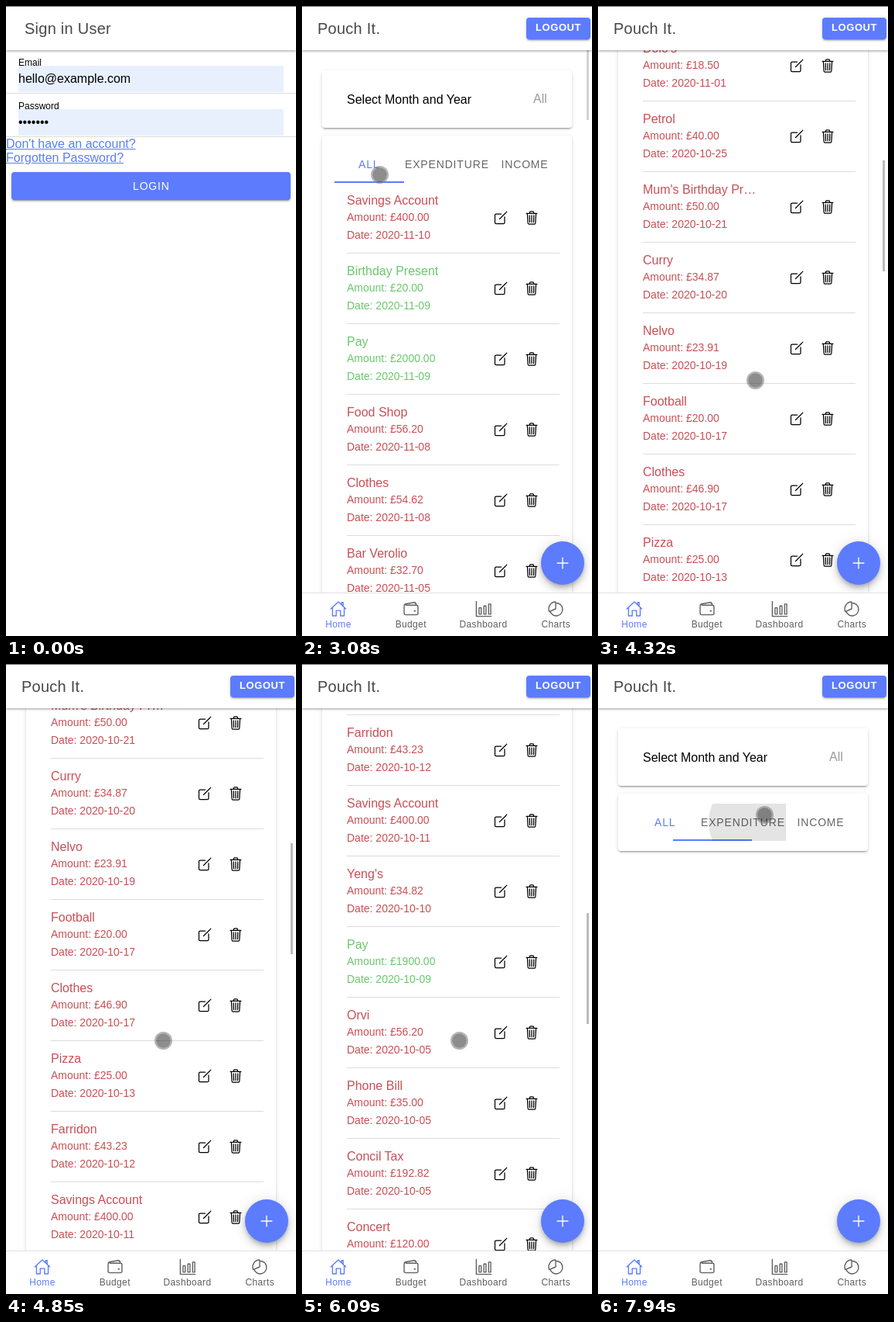
Recreate the animation shown at these times as an HTML page. Size 375 by 812 pixels, loop 8 s.

```html
<!DOCTYPE html>
<html lang="en">
<head>
<meta charset="utf-8">
<title>Budget app</title>
<style>
html, body { margin: 0; width: 100%; height: 100%; overflow: hidden; background: #fff; }
body { position: relative; font-family: "Liberation Sans", Arial, sans-serif; color: #000; --blue: #5c7cfd; }
div, p, svg { position: absolute; margin: 0; box-sizing: border-box; }
p { line-height: 20px; white-space: pre; }
svg { fill: none; stroke: currentColor; stroke-width: 32; stroke-linecap: round; stroke-linejoin: round; }
.page { width: 375px; height: 812px; overflow: hidden; background: #fff; }
.header { width: 375px; height: 57px; background: #fff; color: #484848; box-shadow: 0 1px 3px rgba(0,0,0,.4); }
.header p { letter-spacing: .0125em; }
.button { background: var(--blue); color: #fff; border-radius: 4px; }
.button, .card { box-shadow: 0 3px 1px -2px rgba(0,0,0,.2), 0 2px 2px rgba(0,0,0,.14), 0 1px 5px rgba(0,0,0,.12); }
.header .button p { letter-spacing: .045em; font-weight: 600; }
.field { background: #e8f0fe; }
.line { background: #dcdcdc; }
.link p { color: var(--blue); text-decoration: underline; }
.card { border-radius: 4px; background: #fff; }
#press { left: 7px; top: 214px; width: 361px; height: 36px; border-radius: 4px;
  box-shadow: 0 5px 5px -3px rgba(0,0,0,.2), 0 4px 8px 1px rgba(0,0,0,.14), 0 2px 9px 1px rgba(0,0,0,.12); }
#wave { width: 361px; height: 36px; border-radius: 4px; background: #fff; }
#scroll { width: 375px; height: 812px; }
#list { left: 26px; top: 167px; width: 323px; }
#mark { top: 226px; height: 2px; background: var(--blue); }
#ripple { left: 133px; top: 180px; width: 110px; height: 48px; background: rgba(0,0,0,.105); }
#thumb { left: 368px; width: 3px; height: 143px; background: #bbb; }
#fab { left: 309px; top: 690px; width: 56px; height: 56px; border-radius: 50%; background: var(--blue); color: #fff;
  box-shadow: 0 3px 5px -1px rgba(0,0,0,.2), 0 6px 10px rgba(0,0,0,.14), 0 1px 18px rgba(0,0,0,.12); }
#tabs { top: 756px; width: 375px; height: 56px; background: #fff; border-top: 1px solid #e2e2e2; }
#cursor { width: 23px; height: 23px; border-radius: 50%; background: rgba(40,40,40,.53) content-box;
  padding: 2px; box-shadow: inset 0 0 0 2px rgba(120,120,120,.55); }
#top { width: 375px; height: 1px; background: #777; }
</style>
</head>
<body>
<script>
const LOOP = 8000, FPS = 13, PITCH = 91;

// y is the vertical middle of the line
const text = (x, y, size, str, css = '') =>
  `<p style="left:${x}px;top:${y - 10}px;font-size:${size}px;${css}">${str}</p>`;
const box = (cls, x, y, w, h, inner = '') =>
  `<div class="${cls}" style="left:${x}px;top:${y}px;width:${w}px;height:${h}px">${inner}</div>`;
const icon = (x, y, size, d, color) =>
  `<svg viewBox="0 0 512 512" width="${size}" height="${size}" style="left:${x}px;top:${y}px;color:${color}"><path d="${d}"/></svg>`;
const tab = (x, str, color) => text(x, 204, 14, str, `letter-spacing:.06em;color:${color}`);

const bars = [0, 1, 2].map(i => `M${116 + 144 * i} 416v${-192 - 56 * i}h64V416z`).join('');
const ICONS = {
  edit: 'M384 224v184a40 40 0 0 1-40 40H104a40 40 0 0 1-40-40V168a40 40 0 0 1 40-40h167M218 294L424 88M446 66l8-8',
  trash: 'M112 112l20 320q4 32 32 32h184q28 0 32-32l20-320M80 112h352M192 112V72q0-24 24-24h80q24 0 24 24v40M256 176v224M184 176l8 224M328 176l-8 224',
  Home: 'M80 212v252h112V304h128v160h112V212M480 256L256 48L32 256M400 179V64h-48v69',
  Budget: 'M96 144h320q48 0 48 48v192q0 48-48 48H96q-48 0-48-48V160q0-42 41-50L352 65q59 0 59 79M352 320h32',
  Dashboard: 'M32 32v448h448' + bars,
  Charts: 'M256 80h16a192 192 0 1 1-183 251M256 48a208 208 0 0 0-190 293L256 256z'
};

// "+" marks income
const rows = `Savings Account|400.00|11-10
+Birthday Present|20.00|11-09
+Pay|2000.00|11-09
Food Shop|56.20|11-08
Clothes|54.62|11-08
Bar Verolio|32.70|11-05
Phone Bill|35.00|11-05
Chinese|14.30|11-04
Power Bill|82.64|11-02
Cinema|6.40|11-02
Dolo's|18.50|11-01
Petrol|40.00|10-25
Mum's Birthday Pr…|50.00|10-21
Curry|34.87|10-20
Nelvo|23.91|10-19
Football|20.00|10-17
Clothes|46.90|10-17
Pizza|25.00|10-13
Farridon|43.23|10-12
Savings Account|400.00|10-11
Yeng's|34.82|10-10
+Pay|1900.00|10-09
Orvi|56.20|10-05
Phone Bill|35.00|10-05
Concil Tax|192.82|10-05
Concert|120.00|10-05`.split('\n').map((row, i) => {
  const [name, sum, day] = row.replace('+', '').split('|');
  const y = 250 + PITCH * i;
  const color = `color:${row[0] === '+' ? '#6ac76c' : '#c94f55'}`;
  return text(58, y + 1, 16, name, color) + text(58, y + 22, 14, 'Amount: £' + sum, color) +
    text(58, y + 45, 14, 'Date: 2020-' + day, color) + box('line', 58, y + 68, 275, 1) +
    icon(247, y + 13, 20, ICONS.edit, '#000') + icon(287, y + 13, 20, ICONS.trash, '#000');
}).join('');

const tabs = ['Home', 'Budget', 'Dashboard', 'Charts'].map((name, i) => {
  const x = 47 + 93.75 * i, color = i ? '#5f5f5f' : 'var(--blue)';
  return icon(Math.round(x) - 11, 9, 22, ICONS[name], color) +
    text(x, 40, 12, name, `transform:translateX(-50%);letter-spacing:.03em;color:${color}`);
}).join('');

const field = (y, label, value) => text(16, y, 12, label) + box('field', 16, y + 4, 343, 34) +
  text(16, y + 21, 16, value) + box('line', 0, y + 39, 375, 1);

document.body.innerHTML = `
<div class="page">
  <div class="header">${text(24, 29, 20, 'Sign in User')}</div>
  ${field(73, 'Email', 'hello@example.com')}${field(129, 'Password', '•••••••')}
  <div class="link">${text(0, 178, 16, "Don't have an account?")}${text(0, 196, 16, 'Forgotten Password?')}</div>
  <div id="press"></div>
  ${box('button', 7, 214, 361, 36, '<div id="wave"></div>' + text(157, 18, 14, 'LOGIN', 'letter-spacing:.06em'))}
</div>
<div class="page" id="home">
  <div id="scroll">
    ${box('card', 26, 83, 323, 74)}
    ${text(58, 121, 16, 'Select Month and Year')}${text(299, 120, 16, 'All', 'color:#999')}
    <div class="card" id="list"></div>
    ${tab(73, 'ALL', 'var(--blue)')}${tab(133, 'EXPENDITURE', '#666')}${tab(257.5, 'INCOME', '#666')}
    <div id="mark"></div><div id="ripple"></div>
    <div id="rows">${rows}</div>
  </div>
  <div id="thumb"></div>
  <div class="header">${text(20, 29, 20, 'Pouch It.')}${box('button', 290, 15, 83, 28, text(12, 13, 13, 'LOGOUT'))}</div>
  <div id="fab">${icon(17, 17, 22, 'M256 96v320M96 256h320', '#fff')}</div>
  <div id="tabs">${tabs}</div>
</div>
<div id="cursor"></div><div id="top"></div>`;

const $ = id => document.getElementById(id).style;
const ramp = (t, a, b) => Math.max(0, Math.min(1, (t - a) / (b - a)));
const smooth = p => p * p * (3 - 2 * p);
const easeOut = p => 1 - (1 - p) ** 2;

// start, end, target x, target y
const hops = [[385, 808, 217, 227], [1050, 1150, 211.5, 241.5], [2780, 3070, 100.5, 217.5],
  [3100, 3570, 203.5, 482.5], [4640, 4700, 203.5, 485.5], [6950, 7700, 215.5, 194.5]];
// start, end, distance; the first only flashes the scroll bar
const scrolls = [[2690, 2740, 0], [3573, 4460, 1200], [4639, 4900, 100], [5400, 6070, 500], [6340, 7100, -1800]];

function draw(t) {
  let x = 314, y = 678;
  for (const [a, b, toX, toY] of hops) {
    const p = ramp(t, a, b);
    x += (toX - x) * p;
    y += (toY - y) * easeOut(p);
  }
  $('cursor').transform = `translate(${x - 11.5}px,${y - 11.5}px)`;
  $('cursor').opacity = t >= 360 ? 1 : 0;

  // login button press
  $('press').opacity = ramp(t, 1290, 1480) - ramp(t, 1720, 1920);
  $('wave').opacity = .16 * (ramp(t, 1290, 1365) - ramp(t, 1700, 1900));
  $('wave').clipPath = `circle(${20 + 230 * easeOut(ramp(t, 1290, 1650))}px at 205px 27px)`;

  // home page rises in
  const enter = easeOut(ramp(t, 2130, 2430));
  $('home').opacity = enter;
  $('home').transform = `translateY(${40 * (1 - enter)}px)`;

  const tapped = t >= 7840, filled = t >= 2690 && !tapped;
  let top = 0, glow = 0;
  for (const [a, b, distance] of scrolls) {
    top += distance * smooth(ramp(t, a, b));
    if (t >= a) glow = 1 - ramp(t, b + 310, b + 390);
  }
  $('scroll').transform = `translateY(${-Math.round(top)}px)`;
  $('rows').display = filled ? 'block' : 'none';
  $('list').height = filled ? '2600px' : '74px';
  $('thumb').top = 4 + top / 5.68 + 'px';
  $('thumb').opacity = filled ? glow : 0;

  // tab switch
  const slide = tapped ? ramp(t, 7820, 7992) : 0, grow = ramp(t, 7840, 7923);
  $('mark').left = 42 + 91 * slide + 'px';
  $('mark').width = 90 + 20 * slide + 'px';
  $('ripple').display = tapped ? 'block' : 'none';
  $('ripple').clipPath = `circle(${25 + 32 * grow}px at ${77 - 10 * grow}px ${20 + 4 * grow}px)`;
}

// the picture advances in even ticks, like a screen recording
const start = performance.now();
function frame() {
  const t = (performance.now() - start) % LOOP;
  draw(Math.floor(t * FPS / 1000) * 1000 / FPS);
  requestAnimationFrame(frame);
}
frame();
</script>
</body>
</html>
```
